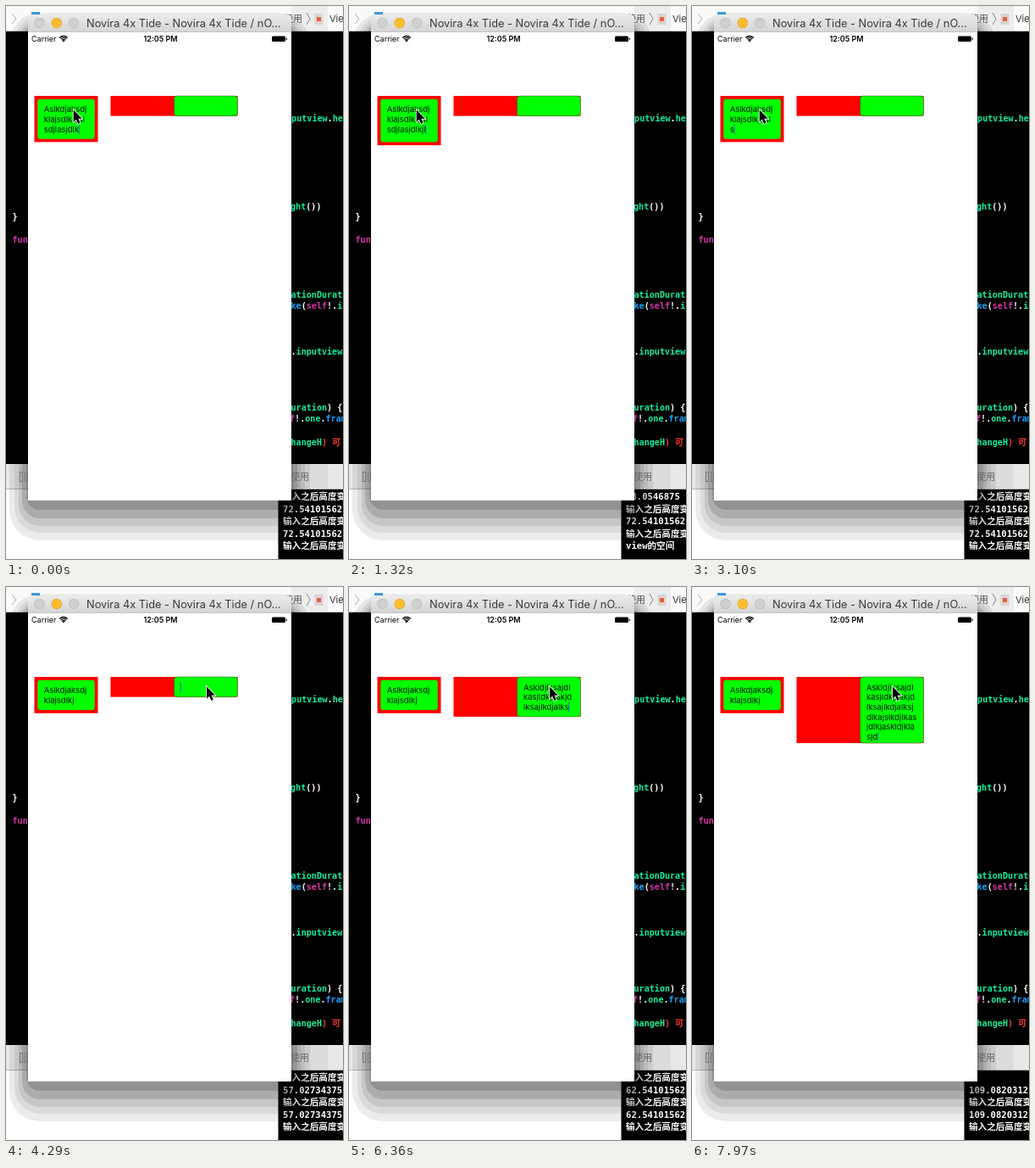
Recreate the animation shown at these times as an HTML page with a canvas. Size 398x652 px, loop 8 s.

```html
<!DOCTYPE html>
<html lang="en">
<head>
<meta charset="utf-8">
<style>
html, body { margin: 0; width: 100%; height: 100%; overflow: hidden; background: #fff; }
canvas { display: block; width: 398px; height: 652px; }
</style>
</head>
<body>
<canvas id="stage"></canvas>
<script>
const W = 398, H = 652, LOOP = 8000, STEP = 147.7;
const ZOOM = 0.75, LEADING = 15.513671875;
const UI = 'Inter, "Noto Sans CJK SC", "Noto Sans CJK", sans-serif';
const MONO = '"DejaVu Sans Mono", "Noto Sans CJK SC", "Noto Sans CJK", monospace';
const GREEN = '#12f09a', PINK = '#d636a8', BLUE = '#1ca4ff', WHITE = '#fff';

const canvas = document.getElementById('stage');
const scale = window.devicePixelRatio || 1;
canvas.width = W * scale;
canvas.height = H * scale;
const c = canvas.getContext('2d');
c.scale(scale, scale);

// Typed text, already wrapped, and [step, characters] keys.
const first = {
  lines: ['Aslkdjaksdj', 'klajsdlkjasl', 'sdjlasjdlkjl', 'asjdl'],
  keys: [[0, 33], [3, 40], [4, 40], [9, 35], [11, 32], [12, 32], [13, 31], [14, 31],
    [16, 29], [17, 29], [18, 28], [19, 26], [22, 23], [23, 21], [24, 20]],
  pad: 10
};
const second = {
  lines: ['Askldjlksajdl', 'kasjldkjsakjd', 'lksajlkdjalksj', 'dlkajslkdjlkas', 'jdlkjaskldjkla', 'sjd'],
  keys: [[31, 0], [32, 2], [43, 39], [48, 54], [54, 71]],
  pad: 0
};

function track(keys, x) {
  if (x <= keys[0][0]) return keys[0][1];
  for (let i = 1; i < keys.length; i++) {
    const [x0, y0] = keys[i - 1], [x1, y1] = keys[i];
    if (x <= x1) return y0 + (y1 - y0) * (x - x0) / (x1 - x0);
  }
  return keys[keys.length - 1][1];
}

function rect(x, y, w, h, color) {
  c.fillStyle = color;
  c.fillRect(x, y, w, h);
}

function round(x, y, w, h, r, color) {
  c.fillStyle = color;
  c.beginPath();
  c.roundRect(x, y, w, h, r);
  c.fill();
}

function disc(x, y, r, color) {
  c.fillStyle = color;
  c.beginPath();
  c.arc(x, y, r, 0, 7);
  c.fill();
}

function line(points, color, width = 1) {
  c.strokeStyle = color;
  c.lineWidth = width;
  c.beginPath();
  points.forEach(([x, y]) => c.lineTo(x, y));
  c.stroke();
}

function text(s, x, y, font, color, align = 'left') {
  c.font = font;
  c.fillStyle = color;
  c.textAlign = align;
  c.fillText(s, x, y);
}

function code(x, y, ...parts) {
  for (let i = 0; i < parts.length; i += 2) {
    text(parts[i], x, y, `bold 10.1px ${MONO}`, parts[i + 1]);
    x += c.measureText(parts[i]).width;
  }
}

const points = (field, n) => 16 + field.pad + LEADING * n;

function typed(field, step) {
  let left = Math.round(track(field.keys, step));
  const rows = [];
  for (const s of field.lines) {
    rows.push(s.slice(0, left));
    left -= s.length;
    if (left <= 0) break;
  }
  return rows;
}

// Current rows, eased height and the latest change in row count.
function state(field, step) {
  const rows = typed(field, step), n = rows.length;
  let age = 0, prev = n;
  while (age < 4 && step - age > 0) {
    prev = typed(field, step - age - 1).length;
    if (prev !== n) break;
    age++;
  }
  const p = Math.min(1, (age * STEP + 130) / 300);
  const from = points(field, prev), to = points(field, n);
  return { rows, n, prev, age, height: ZOOM * (to + (from - to) * (1 - p) ** 2) };
}

function drawPanels() {
  rect(0, 0, W, 30, '#fafafa');
  rect(0, 29, W, 1, '#c8c8c8');
  rect(30, 7, 10, 4, '#3d9be0');
  rect(0, 30, W, 510, '#000');
  rect(0, 540, W, 30, '#e8e8e8');
  rect(0, 569, W, 1, '#b8b8b8');
  rect(0, 570, W, 82, '#fff');
}

function drawLabels() {
  line([[7, 9], [12, 15], [7, 21]], '#aaa');
  text('使用', 328, 19, `11px ${UI}`, '#555');
  line([[355, 8], [359, 15], [355, 22]], '#888');
  rect(364.5, 9, 10, 13, '#d9d4d2');
  rect(367, 13, 5, 5, '#e85f3c');
  text('View', 382, 19, `11px ${UI}`, '#333');

  code(7.5, 252, '}', WHITE);
  code(7.5, 279, 'func', PINK);
  code(332.5, 95, ',', WHITE);
  code(331, 136, 'nputview', GREEN, '.', WHITE, 'hei', GREEN);
  code(336, 240, 'ght', GREEN, '())', WHITE);
  code(336.5, 344, 'ationDurati', GREEN);
  code(336.5, 357, 'ke', BLUE, '(', WHITE, 'self', PINK, '!.', WHITE, 'in', GREEN);
  code(336.5, 411, '.', WHITE, 'inputview', GREEN);
  code(336.5, 477, 'uration', GREEN, ') {', WHITE);
  code(335, 490, 'f', PINK, '!.', WHITE, 'one', GREEN, '.', WHITE, 'fram', BLUE);
  code(336.5, 518, 'hangeH', GREEN, ') 可', '#ff3b30');

  c.strokeStyle = '#777';
  c.lineWidth = 1;
  c.strokeRect(16.5, 549.5, 3, 11);
  c.strokeRect(22.5, 549.5, 3, 11);
  text('使用', 336, 559, `11px ${UI}`, '#666');
}

function drawShadow() {
  [0, 540].forEach(y => rect(337, y, 43, 29, 'rgba(0,0,0,.05)'));
  const bands = [[22, 630, .08], [16, 621, .07], [11, 613, .09], [7, 604, .13], [2, 594, .15]];
  bands.forEach(([e, bottom, a]) => {
    const top = 24 - e * .7;
    round(26 - e, top, 311 + 2 * e, bottom - top, 14 + e, `rgba(0,0,0,${a})`);
  });
}

function drawConsole(s, field) {
  const msg = '输入之后高度变化';
  const num = n => String(points(field, n)).slice(0, 11);
  const now = num(s.n);
  let rows = [msg, now, msg, now, msg];
  if (s.age === 0 && s.n < s.prev) rows = [num(s.prev), msg, now, msg, 'view的空间'];
  if (s.age === 0 && s.n > s.prev) rows = ['', now, msg, now, msg];
  rect(321.5, 570, 77, 82, '#000');
  rows.forEach((r, i) => text(r, 327, 582 + i * 14.5, `bold 10.6px ${MONO}`, WHITE));
}

function drawWindow() {
  const bar = c.createLinearGradient(0, 10, 0, 31);
  bar.addColorStop(0, '#ebebeb');
  bar.addColorStop(1, '#d4d4d4');
  round(26, 10, 311, 30, [5, 5, 0, 0], bar);
  rect(26, 31, 311, 552, '#fff');
  rect(26, 30, 311, 1, '#c4c4c4');
  ['#cfcfcf', '#fdbc2f', '#cfcfcf'].forEach((color, i) => {
    disc(39.5 + i * 20.3, 20, 6.2, i === 1 ? '#e0a02a' : '#bcbcbc');
    disc(39.5 + i * 20.3, 20, 5.6, color);
  });
  text('Novira 4x Tide - Novira 4x Tide / nO...', 95, 25, `12.8px ${UI}`, '#3a3a3a');

  text('Carrier', 30, 42, `9px ${UI}`, '#000');
  text('12:05 PM', 182.5, 42, `600 9px ${UI}`, '#000', 'center');
  c.strokeStyle = '#000';
  c.lineWidth = 1.4;
  [2.3, 4.4, 6.5].forEach(r => {
    c.beginPath();
    c.arc(68, 42, r, -Math.PI * .76, -Math.PI * .24);
    c.stroke();
  });
  disc(68, 41.3, 1, '#000');
  round(314, 35.5, 16, 6.5, 1.5, '#000');
  rect(330.8, 37.5, 1, 2.5, '#000');
}

function drawRows(rows, x, y, caret) {
  const lead = LEADING * ZOOM;
  rows.forEach((r, i) => text(r, x, y + i * lead, `9.5px ${UI}`, '#001000'));
  if (!caret) return;
  const last = rows.length - 1;
  const end = x + c.measureText(rows[last]).width;
  rect(end - .4, y + last * lead - 9, 1.2, 11.5, 'rgba(50,80,230,.75)');
}

function drawCursor(x, y) {
  c.beginPath();
  [[0, 0], [0, 14.4], [3.2, 11.3], [5.5, 16.5], [7.8, 15.4], [5.6, 10.4], [10, 10.4]]
    .forEach(([dx, dy]) => c.lineTo(x + dx, y + dy));
  c.closePath();
  c.strokeStyle = '#fff';
  c.lineWidth = 1.7;
  c.stroke();
  c.fillStyle = '#000';
  c.fill();
}

function draw(t) {
  const step = Math.floor((t + 10) / STEP);
  const a = state(first, step), b = state(second, step);
  const active = step < 32 ? 0 : 1;

  drawPanels();
  drawConsole(active ? b : a, active ? second : first);
  drawShadow();
  drawLabels();
  drawWindow();

  rect(33.5, 106, 75, a.height, '#f00');
  round(37.25, 109.75, 67.5, a.height - 7.5, 3, '#0f0');
  drawRows(a.rows, 44.7, 125.4, step < 29);

  rect(123.5, 106, 150, b.height, '#f00');
  round(198.5, 106, 75, b.height, 3.5, '#0f0');
  c.strokeStyle = 'rgba(70,30,0,.55)';
  c.lineWidth = .75;
  c.stroke();
  drawRows(b.rows, 206, 121.7, step >= 29);

  const move = track([[25, 0], [26, .25], [27, .75], [28, 1]], step);
  drawCursor(79.7 + 157.3 * move, 122.4 - 5 * move);
}

const start = performance.now();
function tick() {
  draw((performance.now() - start) % LOOP);
  requestAnimationFrame(tick);
}
tick();
</script>
</body>
</html>
```
